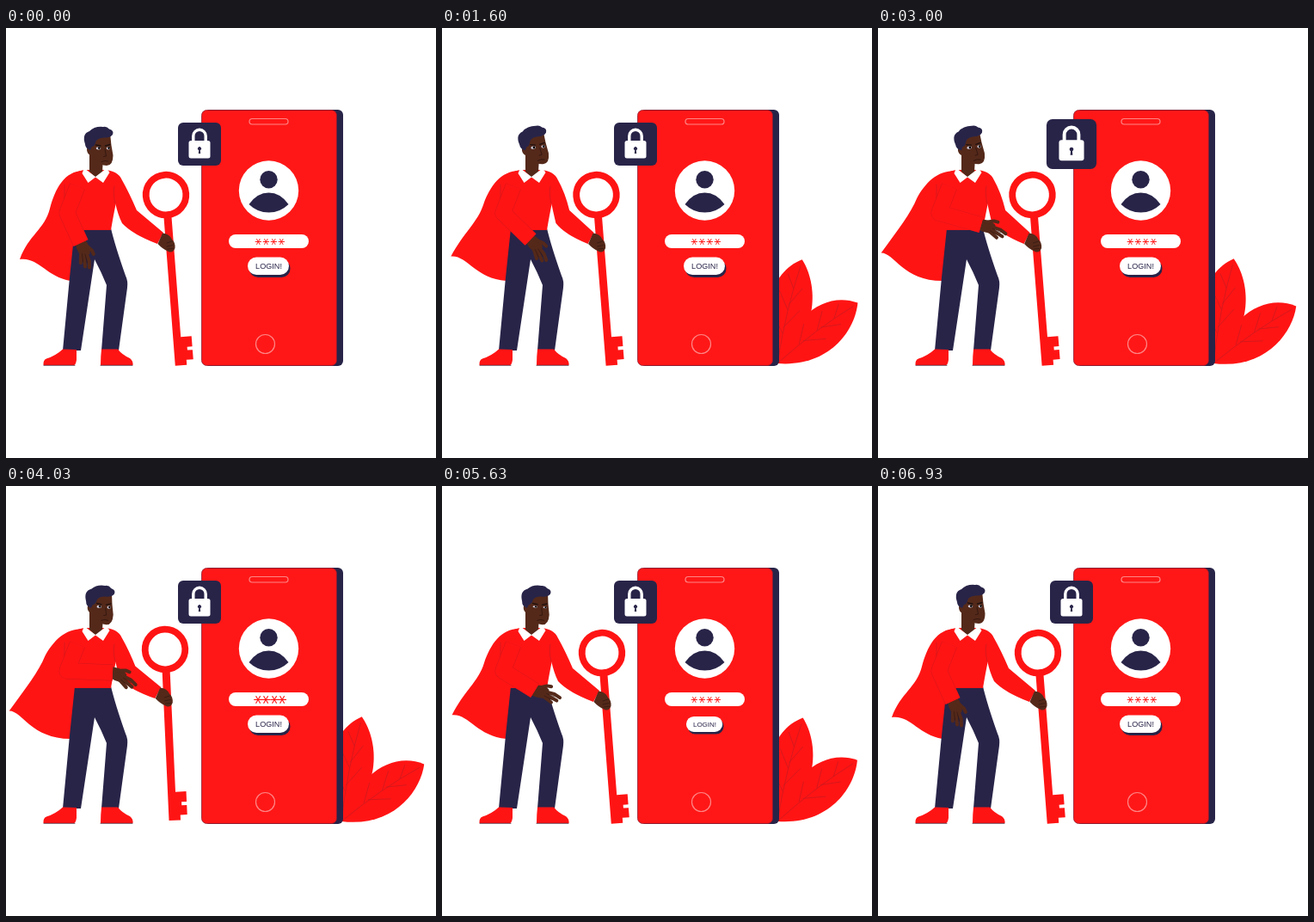
Animation of 500x500 px, one loop 7010 ms. Source, as an HTML page:

```html
<!DOCTYPE html>
<html lang="en">
<head>
<meta charset="utf-8">
<title>Secure login</title>
<style>
  html, body { margin: 0; width: 100%; height: 100%; overflow: hidden; background: #fff; }
  svg { display: block; width: 100vw; height: 100vh; }
  text { font-family: "Liberation Sans", Arial, sans-serif; text-anchor: middle; }
  #stars text { font: 16px "DejaVu Sans", sans-serif; }
  .red { fill: #ff1414; }
  .navy { fill: #282448; }
  .skin { fill: #54291a; }
  .white { fill: #fff; }
  .line { fill: none; stroke-linecap: round; stroke-linejoin: round; }
  .fold { stroke: #c91a1f; stroke-width: .7; }
  .sleeve { fill: none; stroke-linejoin: round; }
</style>
</head>
<body>
<svg viewBox="0 0 500 500">
  <defs>
    <g id="leaf">
      <path class="red" d="M0 0C45-34 95-34 117 0C95 24 45 40 0 0Z"/>
      <path class="line fold" d="M0 0Q60-5 110 0M34-3L52-18M60-3L78-17M84-2L98-12M40-3L62 11M66-3L86 8"/>
    </g>
  </defs>

  <g id="upper"><use href="#leaf" transform="scale(1.06 1)"/></g>
  <g id="lower"><use href="#leaf"/></g>

  <!-- phone -->
  <rect class="navy" x="231" y="95" width="161" height="298" rx="6"/>
  <rect x="227.5" y="95.5" width="157" height="297" rx="6" fill="#ff1717" stroke="#8d1a30" stroke-width=".8"/>
  <g fill="none" stroke="#ff8585" stroke-width="1.2">
    <rect x="283" y="105.5" width="45" height="6.5" rx="3.2"/>
    <circle cx="301.5" cy="367.5" r="11"/>
  </g>
  <circle class="white" cx="305.5" cy="189" r="34.7"/>
  <circle class="navy" cx="305.5" cy="176.3" r="10.2"/>
  <path class="navy" d="M282.5 205Q292 191.5 305.5 191.5Q319 191.5 328.500 205Q319 214.500 305.500 214.500Q292 214.500 282.500 205Z"/>
  <rect class="white" x="259" y="240" width="93" height="16" rx="8"/>
  <g id="stars" class="red"></g>
  <g id="login">
    <rect class="navy" x="283" y="269.5" width="47.5" height="20.5" rx="10"/>
    <rect class="white" x="281" y="266.5" width="48" height="20.5" rx="10.2"/>
    <text class="navy" x="305.5" y="280" font-size="9.1">LOGIN!</text>
  </g>
  <g id="lock">
    <rect class="navy" x="200" y="110" width="50" height="50" rx="6"/>
    <path class="line" stroke="#fff" stroke-width="3.4" d="M217.8 133V125.5a7.2 7.2 0 0 1 14.4 0V133"/>
    <rect class="white" x="212.5" y="131" width="25" height="20.5" rx="2.5"/>
    <path class="navy" d="M223.8 146l.4-4a2 2 0 1 1 1.6 0l.4 4Z"/>
  </g>

  <!-- hero -->
  <path id="cape" class="red"/>
  <path class="navy" d="M80 233H122Q127 254 139 288Q142 294 141 302L131 375H111L117 299Q111 284 103 269L87 375H66L74 290Z"/>
  <path class="red" d="M66 373.5L82 374V386Q81 392 79 392H43.5Q43 386 47 384.5Q58 381 66 373.5ZM111 373.5H130Q135 380 144 384Q148 387 147.5 392H110Q110 382 111 373.5Z"/>
  <path class="line" stroke="#4a1a30" stroke-width=".8" d="M44 392.3H80M110 392.3H147"/>
  <path class="red" d="M91 165Q76 167 72 180L78 235H122Q125 217 128 203L130 175L118 165Z"/>
  <path id="keyArm" class="red"/>
  <path class="line fold" d="M127 204Q124 192 126 184M68 182V216"/>
  <path class="skin" d="M97 143L113 150L112 168L104 174L97 167Z"/>
  <path class="white" d="M91 163L104 173L117 163L120.5 168L113 180L104 173.5L95.5 180L88.5 169Z"/>

  <g id="head">
    <path class="skin" d="M97 127L121 122Q122 136 124.500 148Q124.500 160 117 160Q109 160 103 152L98 148Q94 146 94 141Q95 136 99 138Z"/>
    <path class="navy" d="M92 135Q88 123 97 120Q103 114 113 115Q117 114 120 117.5Q126 119 124 124Q121 128 114 127.5Q106 128 104.5 132Q103 138 100 138L98 142Q92 140 92 135Z"/>
    <path class="line" stroke="#21120f" stroke-width="1.3" d="M104.5 136L110 137M115.5 137L121 135.5"/>
    <g id="eyes">
      <ellipse cx="107.5" cy="139.8" rx="2.8" ry="1.6" fill="#d8d4e4"/>
      <ellipse cx="119" cy="139.8" rx="2.2" ry="1.6" fill="#d8d4e4"/>
      <circle cx="108.3" cy="139.6" r="1.4"/><circle cx="119.6" cy="139.6" r="1.3"/>
    </g>
    <path class="line" stroke="#32160f" stroke-width=".9" d="M115 141L116.5 149L113.5 149.5M111 155.5Q115 153.5 119 155"/>
  </g>

  <g id="key" class="red">
    <circle r="23.3" fill="none" stroke="#ff1414" stroke-width="7.8"/>
    <path d="M-4.500 24H4.500V166H17V178H11V182H17V193H9V199H-4.500Z"/>
  </g>
  <g id="grip">
    <path class="skin" d="M182 238.5Q190 239 193 246Q197 249 196.5 256Q194 262 189 260Q182 257 176.5 251Z"/>
    <path class="line" stroke="#32160f" stroke-width=".7" d="M187 250L193 248M187 254L194 252.5M188 257L194 256.5"/>
  </g>

  <g id="hand">
    <path class="skin" d="M-3-6Q10-9 16-4Q18 4 12 7Q5 8-3 6Z"/>
    <path class="line" stroke="#54291a" stroke-width="4" d="M4-4L13-8L18-8M12-1L23 0L30 3M12 2L27 7M9 4L21 10"/>
    <path class="line" stroke="#32160f" stroke-width=".6" d="M14 1L24 3M12 4L21 7"/>
  </g>
  <path id="sleeveEdge" class="sleeve" stroke="#d0161b" stroke-width="18.8"/>
  <path id="sleeve" class="sleeve" stroke="#ff1414" stroke-width="18"/>
</svg>

<script>
const LOOP = 7010;
const $ = id => document.getElementById(id);
const set = (id, name, value) => $(id).setAttribute(name, value);
const move = (id, value) => set(id, 'transform', value);

const smooth = (a, b, t) => {
  const x = Math.min(1, Math.max(0, (t - a) / (b - a)));
  return x * x * (3 - 2 * x);
};
// Half a sine wave between a and b, zero elsewhere
const pulse = (a, b, t) => t > a && t < b ? Math.sin(Math.PI * (t - a) / (b - a)) : 0;
// Eased values from rows of [seconds, ...values]
const track = (rows, t) => {
  const next = rows.findIndex(r => r[0] > t);
  if (next < 0) return rows.at(-1).slice(1);
  const a = rows[next - 1], b = rows[next];
  const k = smooth(a[0], b[0], t);
  return a.slice(1).map((v, j) => v + (b[j + 1] - v) * k);
};
const scaleAt = (x, y, sx, sy = sx) => `translate(${x} ${y}) scale(${sx} ${sy}) translate(${-x} ${-y})`;

// Angle of the head
const HEAD = [[0, 0], [.85, -6], [3.1, -6], [4.1, 4], [6.1, 4], [6.9, 0]];
// Ring centre and tilt of the key
const KEY = [[0, 186, 194, 4.4], [.15, 186, 194, 4.4], [.8, 186, 189, 4.1], [1.5, 179.5, 194, 4.5],
  [3.3, 179.5, 194, 4.5], [4.03, 185, 190, 2.6], [4.7, 186, 194, 4.4]];
// Wrist position and angle of the free hand
const WRIST = [[0, 87, 250, 65], [.8, 103, 246, 47], [1.7, 103, 246, 47], [2.9, 120, 229, 14],
  [3.1, 120, 229, 14], [4, 124, 217, 22], [4.5, 124, 217, 22], [5.4, 108, 238, 10],
  [5.8, 108, 238, 10], [6.85, 87, 250, 65]];

$('stars').innerHTML = '<g><text y="8.2">*</text></g>'.repeat(4);
const stars = [...$('stars').children];

function draw(t) {
  const sway = (1 - Math.cos(2 * Math.PI * t * 1000 / LOOP)) / 2;

  const grow = smooth(0, .93, t) * (1 - smooth(5.95, 6.78, t));
  const leaf = (id, angle) => move(id, `translate(390 390) rotate(${-angle}) scale(${grow})`);
  leaf('upper', 74.6 + 4.6 * sway);
  leaf('lower', 39 - 4.6 * sway);

  // Cape points drift with the sway
  const p = (x, y, dx, dy) => `${x + dx * sway} ${y + dy * sway} `;
  set('cape', 'd', 'M90 166C68 166 ' + p(57, 187, -2, -7) + p(51, 210, -6, -13) +
    'C' + p(45, 234, -7, -20) + p(26, 241, -4, -5) + p(16, 269, -13, -8) +
    'C' + p(38, 266, -20, -5) + p(46, 289, -18, 5) + '75 294L84 230Z');

  move('lock', scaleAt(225, 135, 1 + .28 * pulse(1.8, 3.3, t)));
  move('login', scaleAt(305.5, 278, 1 - .12 * pulse(5.3, 5.95, t)));
  const size = 1 + .3 * pulse(3.6, 4.45, t);
  stars.forEach((s, i) => s.setAttribute('transform',
    `translate(${292.8 + 9.2 * i} 248.5) rotate(90) scale(${size})`));

  move('head', `rotate(${track(HEAD, t)[0]} 100 152)`);
  move('eyes', scaleAt(113, 140, 1, 1 - .9 * pulse(5.1, 5.7, t)));

  const [kx, ky, tilt] = track(KEY, t);
  move('key', `translate(${kx} ${ky}) rotate(${-tilt})`);
  const dx = kx - 186 + 55 * (tilt - 4.4) * Math.PI / 180, dy = ky - 194;
  move('grip', `translate(${dx} ${dy})`);
  const arm = (x, y, k) => `${x + dx * k} ${y + dy * k} `;
  set('keyArm', 'd', 'M112 165Q130 165 135 177Q143 191 ' + arm(152, 212, .6) +
    'L' + arm(183, 238, 1) + arm(176, 251, 1) +
    'Q' + arm(147, 240, .7) + arm(135, 227, .4) + 'Q130 217 127 203Z');

  const [wx, wy, turn] = track(WRIST, t);
  move('hand', `translate(${wx} ${wy}) rotate(${turn})`);
  for (const id of ['sleeve', 'sleeveEdge']) set(id, 'd', `M83 184L71 215L${wx} ${wy}`);
}

const start = performance.now();
(function frame() {
  draw((performance.now() - start) % LOOP / 1000);
  requestAnimationFrame(frame);
})();
</script>
</body>
</html>
```
